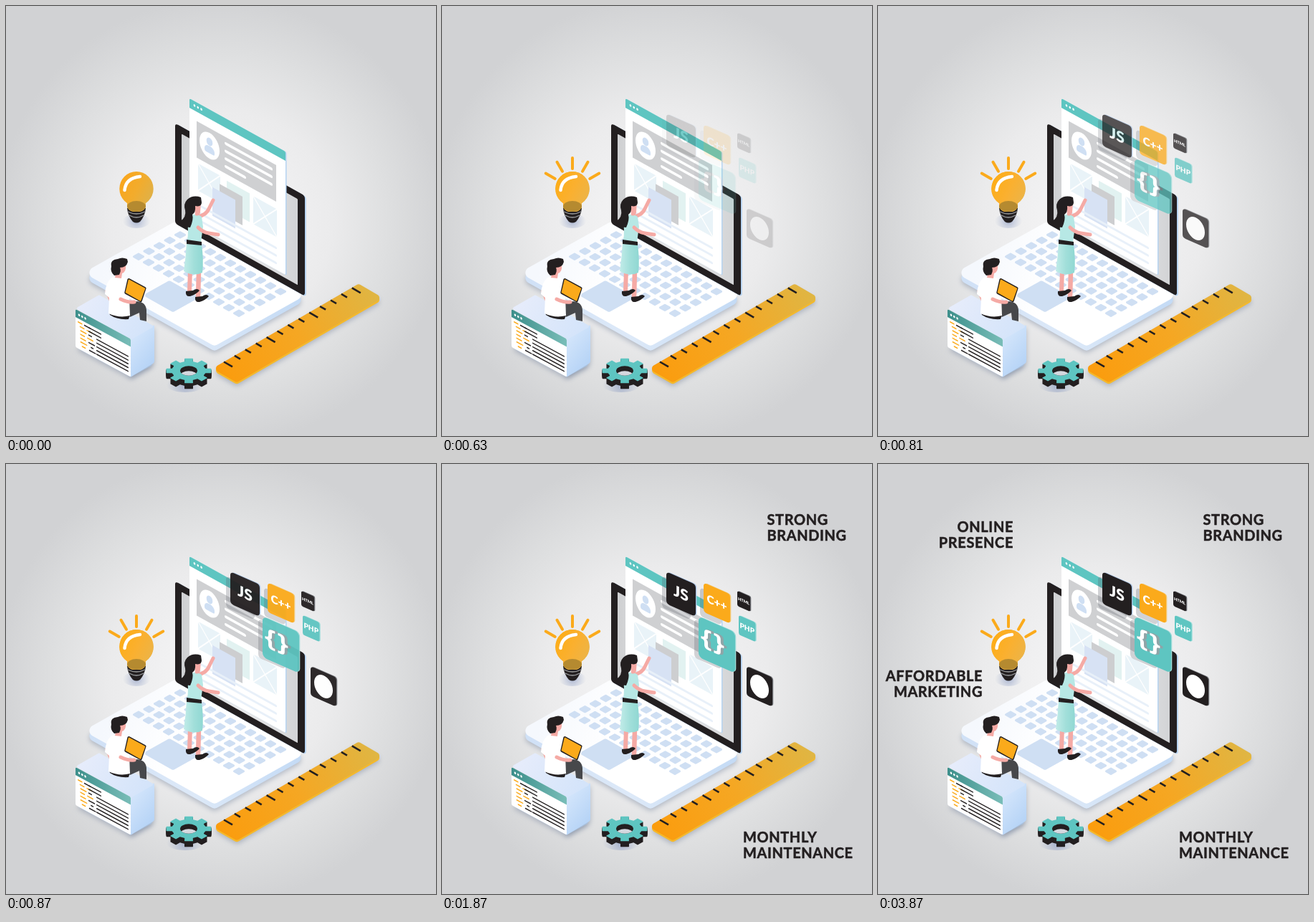
An HTML page with a canvas for the animation above (5.9 s loop, 600 by 600 pixels).

```html
<!DOCTYPE html>
<html lang="en">
<head>
<meta charset="utf-8">
<title>Web services</title>
<style>
html, body { margin: 0; width: 100%; height: 100%; overflow: hidden; background: #d1d2d4; }
canvas { display: block; width: 600px; height: 600px; }
</style>
</head>
<body>
<canvas id="stage" width="600" height="600"></canvas>
<script>
const LOOP = 5900, STEP = 30;
const INK = '#231f20', TEAL = '#5ec5c1', AMBER = '#fbaa1b', SKY = '#cfdff3', SKIN = '#f5aaa5', SHADE = 'rgba(110,125,150,.45)';
const SANS = 'Lato, "Open Sans", sans-serif';

const stage = document.getElementById('stage').getContext('2d');
let c;

// Runs a drawing function on its own 600 x 600 layer.
function layer(draw) {
  const el = document.createElement('canvas');
  el.width = el.height = 600;
  c = el.getContext('2d');
  draw();
  return el;
}

function stops(g, colors) {
  colors.forEach((col, i) => g.addColorStop(i / (colors.length - 1), col));
  return g;
}
const linear = (x0, y0, x1, y1, ...colors) => stops(c.createLinearGradient(x0, y0, x1, y1), colors);
const radial = (x, y, r, ...colors) => stops(c.createRadialGradient(x, y, 0, x, y, r), colors);

// Polygon with corners rounded by r.
function poly(pts, fill, r = 0) {
  const n = pts.length, [ax, ay] = pts[n - 1], [bx, by] = pts[0];
  c.beginPath();
  c.moveTo((ax + bx) / 2, (ay + by) / 2);
  pts.forEach((p, i) => c.arcTo(...p, ...pts[(i + 1) % n], r));
  c.closePath();
  c.fillStyle = fill;
  c.fill();
}

// Flat isometric tile: u runs right and down, v runs left and down from the back corner.
function floor(x, y, u, v, fill, r, k = .56) {
  poly([[x, y], [x + u, y + u * k], [x + u - v, y + (u + v) * k], [x - v, y + v * k]], fill, r);
}

function shape(d, fill) {
  c.fillStyle = fill;
  c.fill(new Path2D(d));
}

function stroke(d, color, width, cap = 'round') {
  c.strokeStyle = color;
  c.lineWidth = width;
  c.lineCap = cap;
  c.lineJoin = 'round';
  c.stroke(new Path2D(d));
}

function oval(x, y, rx, ry, fill) {
  c.beginPath();
  c.ellipse(x, y, rx, ry, 0, 0, 7);
  c.fillStyle = fill;
  c.fill();
}

function rect(x, y, w, h, fill, r = 0) {
  c.beginPath();
  c.roundRect(x, y, w, h, r);
  c.fillStyle = fill;
  c.fill();
}

// Draws upright content on a plane that falls to the right.
function plane(x, y, slope, draw) {
  c.save();
  c.transform(1, slope, 0, 1, x, y);
  draw();
  c.restore();
}

function shadowed(draw) {
  c.save();
  c.shadowColor = SHADE;
  c.shadowBlur = 7;
  c.shadowOffsetY = 3;
  draw();
  c.restore();
}

function glow(x, y, rx, ry) {
  oval(x, y, rx, ry, radial(x, y, rx, 'rgba(115,135,185,.55)', 'rgba(150,165,200,0)'));
}

function seeded(seed) {
  return () => (seed = seed * 16807 % 2147483647) / 2147483647;
}

function dots(x, y, gap) {
  for (let i = 0; i < 3; i++) oval(x + i * gap, y, 1.3, 1.6, '#fff');
}

function background() {
  c.fillStyle = radial(300, 300, 312, '#f4f4f5', '#f1f1f2', '#ebebec', '#dedfe0', '#d1d2d4');
  c.fillRect(0, 0, 600, 600);
}

function laptop() {
  shadowed(() => floor(237, 307, 183, 129, linear(112, 0, 415, 0, '#cfe0f6', '#dde9f8', '#c3daf5'), 8));
  floor(237, 300, 183, 129, linear(140, 350, 240, 380, '#f5f8fd', '#fff'), 8);
  for (let row = 0; row < 5; row++) {
    for (let col = 0; col < 11; col++) {
      floor(243 + col * 14 - row * 14.5, 314 + col * 7.9 + row * 7.6, 9.6, 9.6, SKY, 1.5);
    }
  }
  floor(228, 383, 42, 37, '#cfdff3', 3);
  plane(236, 163.5, .56, () => {
    rect(1.8, 0, 181, 140, '#b5d3f2', 4);
    rect(0, 0, 181, 140, INK, 4);
    rect(9, 10, 162, 120, linear(9, 0, 171, 0, '#cfd0d2', '#e9eaeb', '#d3d4d6'), 1);
  });
}

function crossBox(x, y, w, h) {
  rect(x, y, w, h, '#e9f3f8');
  stroke(`M${x} ${y}l${w} ${h}M${x + w} ${y}l${-w} ${h}`, '#fff', 1.5, 'butt');
}

function page() {
  plane(256, 129, .553, () => {
    rect(1.5, 0, 134, 172, '#b5d4f2', 2);
    rect(0, 0, 134, 172, '#fff', 2);
    rect(0, 0, 134, 13, TEAL, [2, 2, 0, 0]);
    dots(7, 6, 4.8);
    rect(10, 26, 111, 51, '#cfd0d2');
    oval(28, 50.5, 14, 18, '#fff');
    oval(28, 45, 4.3, 5.4, SKY);
    rect(21, 51, 14, 10, SKY, [6, 6, 2, 2]);
    for (let i = 0; i < 4; i++) rect(49, 33 + i * 10.7, i < 3 ? 67 : 30, 4, '#fff', 2);
    crossBox(12, 84, 31, 38);
    crossBox(89, 87, 33, 39);
    ['#e2f2f1', '#cdced0', '#d7e2f4'].forEach((fill, i) => rect(52 - i * 10, 86 + i * 10, 32, 40, fill));
    for (let i = 0; i < 3; i++) rect(12, 140 + i * 10.5, 110, 3.4, '#e8f0f9', 1.5);
  });
}

function shoe(x, y) {
  shape(`M${x} ${y}q-1 8 6 7q9 -3 13 -8q-3 -4 -9 0Z`, INK);
}

function woman() {
  stroke('M257 368L256 399', SKIN, 6);
  stroke('M269 370L268 407', SKIN, 6.5);
  shoe(251, 398);
  shoe(264, 406);
  stroke('M268 294Q280 291 283 283L289 271', SKIN, 5);
  shape('M257 293Q265 288 273 294L275 308L272 329L253 327Q255 314 253 302Z', '#b7e8e5');
  shape('M252 330L273 333Q276 354 274 372Q262 378 248 370Q251 350 252 330Z', linear(248, 0, 276, 0, '#c2ece9', '#a2dfda', '#8ed7d2'));
  shape('M252 326L273 329V334L252 332Z', INK);
  stroke('M268 309Q275 316 283 317L296 319', SKIN, 5);
  shape('M263 276L272 274L271 288Q270 294 264 292Z', SKIN);
  shape('M272 267Q261 263 253 270Q247 276 250 285Q252 294 243 301Q246 309 257 309Q262 298 260 291Q265 288 264 279Q273 281 273 274Z', INK);
}

function codeLines() {
  const rnd = seeded(11);
  for (let row = 0; row < 7; row++) {
    const y = 15 + row * 5.2, long = row > 1;
    for (let x = 3 + rnd() * 6; x < 22;) {
      const w = 4 + rnd() * 6;
      rect(x, y, w, 1.6, rnd() < .4 ? AMBER : INK, .8);
      x += w + 2 + rnd() * 3;
    }
    rect(long ? 29 : 18, y, long ? 45 : 18, 1.6, INK, .8);
  }
}

function codeBox() {
  const front = [97, 423], depth = 33, w = 77, h = 53, k = .54;
  const [x, y] = front, side = x + w;
  shadowed(() => {
    floor(x + depth, y - depth * k + h, w, depth, '#c3dbf7', 3, k);
    plane(side, y + w * k, -.6, () => rect(-1, 0, depth + 1, h, linear(0, 0, depth, h, '#d3e5fb', '#b5d3f6'), 2));
  });
  floor(x + depth, y - depth * .6, w, depth, linear(110, 410, 195, 455, '#e6ecfb', '#d4e4fa'), 2, .57);
  plane(x, y, k, () => {
    rect(0, 0, w, h, '#fff', 2);
    rect(0, 0, w, 11, linear(0, 0, w, 0, '#3d8f8b', '#79bdb8'), [2, 2, 0, 0]);
    dots(5, 5.5, 4.3);
    codeLines();
  });
}

function man() {
  shape('M164 417L183 412Q195 413 196 424V440L187 438L186 428L173 434Z', '#47484b');
  shape('M144 427L173 431L171 437Q155 438 145 431Z', INK);
  stroke('M141 398L146 410', SKIN, 5);
  shape('M147 379Q158 374 168 381L172 404L173 432Q158 436 143 429L144 407L138 402Q139 386 147 379Z', '#fff');
  stroke('M160 409Q170 414 179 413', SKIN, 5);
  poly([[170, 379], [196, 393], [189, 414], [165, 401]], INK, 2);
  poly([[171, 381], [194.5, 394], [188, 412], [166.5, 400]], AMBER, 1);
  shape('M155 364L167 361Q168 371 162 373L161 380L152 379Z', SKIN);
  shape('M169 353Q162 350 156 353Q145 354 147 363Q145 371 151 376L158 375Q161 369 159 365Q168 365 170 357Z', INK);
}

function glass(...colors) {
  const fill = linear(160, 245, 205, 268, ...colors);
  rect(169, 268, 26, 19, fill, 9);
  oval(182, 255, 23.7, 24, fill);
  oval(182, 279.5, 13, 7.5, '#b58a30');
  stroke('M165.5 257Q167 240 187 238', '#fff', 4.5);
}

function bulb() {
  glow(182, 300, 19, 10);
  shape('M169 282H195Q194 293 187 301Q182 304 177 301Q170 293 169 282Z', INK);
  stroke('M170 287Q182 293 194 287M172 292Q182 298 192 292', '#9a9c9f', 1.3);
  glass('#f9a61d', '#f2ac2d', '#deb14a');
}

function litBulb() {
  glass('#fdad18', '#fab030', '#ecb448');
  for (let a = 30; a <= 150; a += 30) {
    const x = Math.cos(a * Math.PI / 180), y = -Math.sin(a * Math.PI / 180);
    stroke(`M${182 + 28 * x} ${255 + 28 * y}L${182 + 43 * x} ${255 + 43 * y}`, AMBER, 4);
  }
}

function gear() {
  const x = 255, y = 509, flat = .55;
  const wheel = (dy, fill) => {
    const pts = [];
    for (let i = 0; i < 32; i++) {
      const outer = i % 4 === 1 || i % 4 === 2;
      const a = Math.floor(i / 4) * Math.PI / 4 + (i % 4 < 2 ? -1 : 1) * (outer ? .19 : .24);
      const r = outer ? 32 : 24;
      pts.push([x + r * Math.cos(a), y + dy + r * flat * Math.sin(a)]);
    }
    poly(pts, fill, .8);
  };
  glow(x - 5, y + 20, 26, 10);
  for (let dy = 8; dy > 0; dy--) wheel(dy, INK);
  wheel(0, TEAL);
  c.save();
  oval(x, y, 12, 6.8, INK);
  c.clip();
  oval(x, y + 7, 12, 6.8, '#d5d8df');
  c.restore();
}

function ruler() {
  shadowed(() => floor(492, 390, 34, 204, '#f4b92c', 5, .58));
  floor(492, 387.5, 34, 204, linear(295, 510, 520, 400, '#fb9c0d', '#f5a723', '#dfb644'), 5, .58);
  for (let i = 0; i < 13; i++) {
    const len = i % 4 ? 8 : 12;
    stroke(`M${304 + i * 14.9} ${496.5 - i * 8.6}l${len} ${len * .58}`, INK, 2.6, 'butt');
  }
}

function label(text, x, y, size, fill = '#fff', font = SANS) {
  c.font = `900 ${size}px ${font}`;
  c.textAlign = 'center';
  c.textBaseline = 'middle';
  c.fillStyle = fill;
  c.fillText(text, x, y);
}

function tile(x, y, w, h, fill, edge, draw) {
  plane(x, y, .44, () => {
    rect(1.3, -.7, w, h, edge, w * .12);
    rect(0, 0, w, h, fill, w * .12);
    draw(w / 2, h / 2);
  });
}

function brace(ch, x, y) {
  const font = '"DejaVu Sans", sans-serif';
  for (let d = 4; d >= 0; d--) label(ch, x + d, y - d * .3, 30, d ? '#8fa5a8' : '#fff', font);
}

function icons() {
  const word = (text, size) => (x, y) => label(text, x, y, size);
  for (const [x, y, w, h] of [[307, 156, 40, 44], [360, 172, 30, 40], [352, 216, 38, 54]]) {
    plane(x, y, .44, () => rect(0, 0, w, h, 'rgba(90,95,105,.28)', 5));
  }
  tile(313, 150, 41, 45, INK, '#a9c3e4', word('JS', 21));
  tile(365, 165.5, 37, 41, AMBER, '#f4c874', word('C++', 15.5));
  tile(412, 177, 18, 21, INK, '#6b6d72', word('HTML', 5.6));
  tile(414, 211, 23.5, 27, TEAL, '#a4dfdc', word('PHP', 10));
  tile(358, 212.5, 51, 57, TEAL, '#9fdcd9', (x, y) => {
    brace('{', x - 15, y);
    brace('}', x + 3, y);
  });
  tile(425, 282, 36, 41, INK, '#77797e', (x, y) => oval(x, y, 13, 15.5, '#fff'));
}

function caption(lines, x, y, align) {
  stage.font = `700 20px ${SANS}`;
  stage.letterSpacing = '0.6px';
  stage.textAlign = align;
  stage.fillStyle = stage.strokeStyle = INK;
  stage.lineWidth = .5;
  lines.forEach((line, i) => {
    stage.fillText(line, x, y + i * 22);
    stage.strokeText(line, x, y + i * 22);
  });
}

const captions = [
  [970, ['STRONG', 'BRANDING'], 453.5, 84.5, 'left'],
  [1870, ['MONTHLY', 'MAINTENANCE'], 420, 527.5, 'left'],
  [2870, ['AFFORDABLE', 'MARKETING'], 146, 302.5, 'right'],
  [3870, ['ONLINE', 'PRESENCE'], 189, 94.5, 'right']
];

const scene = layer(() =>
  [background, laptop, page, woman, codeBox, man, bulb, gear, ruler].forEach(draw => draw()));
const lightLayer = layer(litBulb);
const iconLayer = layer(icons);

function blend(image, alpha) {
  stage.globalAlpha = Math.max(0, Math.min(1, alpha));
  stage.drawImage(image, 0, 0);
  stage.globalAlpha = 1;
}

function render(t) {
  const tick = Math.floor(t / STEP);
  blend(scene, 1);
  blend(lightLayer, tick / 20);
  if (tick > 20) blend(iconLayer, (tick - 19.5) / 10);
  for (const [at, ...args] of captions) if (t >= at) caption(...args);
}

let start;
function loop(now) {
  start ??= now;
  render((now - start) % LOOP);
  requestAnimationFrame(loop);
}
render(0);
requestAnimationFrame(loop);
</script>
</body>
</html>
```
